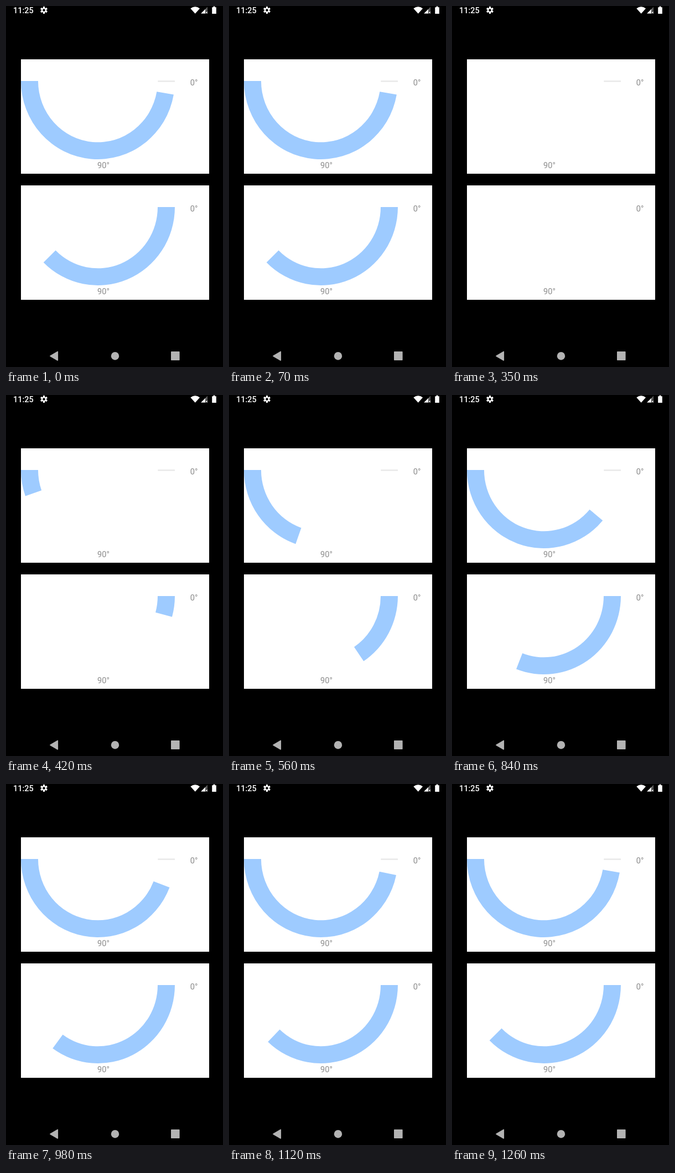
An HTML page for the animation above (2100 ms loop, 392 px wide and 650 px high).

```html
<!DOCTYPE html>
<html lang="en">
<head>
<meta charset="utf-8">
<title>Arc gauges</title>
<style>
  html, body { margin: 0; width: 100%; height: 100%; overflow: hidden; background: #000; }
  svg { display: block; width: 392px; height: 650px; }
  text { font-family: Roboto, sans-serif; }
  .label { font-size: 14.6px; fill: #8c8c8c; }
  .arc { fill: #9ecbff; }
</style>
</head>
<body>
<svg viewBox="0 0 392 650" xmlns="http://www.w3.org/2000/svg">
  <rect width="392" height="650" fill="#000"/>

  <g fill="#fff">
    <text x="13" y="13.2" font-size="14.5" font-weight="500">11:25</text>
    <g transform="translate(68.5 7.5)">
      <path id="gear" fill-rule="evenodd"/>
    </g>
    <path d="M333.3 4.4Q341.7 -1.8 350.1 4.4L341.7 13.8Z"/>
    <path d="M352.2 13.6L364 1.6V13.6Z" fill="#5c5c5c"/>
    <path d="M352.2 13.6L360 5.7V13.6Z"/>
    <rect x="360" y="9" width="5" height="5" fill="#000"/>
    <path d="M360.7 9.8L364 13.3M364 9.8L360.7 13.3" stroke="#fff" stroke-width="1.1"/>
    <path d="M372.2 2.2H374.4V0.8H377.6V2.2H379.8V14H372.2Z"/>
  </g>

  <g>
    <rect x="27" y="96" width="340" height="206" fill="#fff"/>
    <rect x="274.3" y="134.2" width="30.8" height="2.6" fill="#e9e9e9"/>
    <path class="arc" id="top"/>
    <text class="label" x="332.8" y="142.5">0°</text>
    <text class="label" x="165" y="292.2">90°</text>
  </g>

  <g transform="translate(0 227)">
    <rect x="27" y="96" width="340" height="206" fill="#fff"/>
    <path class="arc" id="bottom"/>
    <text class="label" x="332.8" y="142.5">0°</text>
    <text class="label" x="165" y="292.2">90°</text>
  </g>

  <g fill="#b3b3b3" stroke="#b3b3b3" stroke-linejoin="round">
    <path d="M80 630.2L93.3 622.4V638Z" stroke-width="1.6"/>
    <circle cx="197" cy="630.2" r="7.2" stroke="none"/>
    <rect x="298.8" y="622.9" width="14" height="14.4" stroke-width="1.6"/>
  </g>
</svg>
<script>
const LOOP = 2100, STEP = 70;
const START = 374, SPAN = 856, POWER = 2.2;
const CX = 166, CY = 135;
const OUTER = [139, 141], INNER = [108, 110.3];

const byId = id => document.getElementById(id);

function point([rx, ry], deg) {
  const a = deg * Math.PI / 180;
  return (CX + rx * Math.cos(a)).toFixed(2) + ' ' + (CY + ry * Math.sin(a)).toFixed(2);
}

// Ring segment from one angle to a larger one, clockwise from the right.
function ring(from, to) {
  if (to - from < 0.01) return '';
  return `M${point(OUTER, from)}A${OUTER} 0 0 1 ${point(OUTER, to)}` +
         `L${point(INNER, to)}A${INNER} 0 0 0 ${point(INNER, from)}Z`;
}

function gearPath() {
  let d = '';
  for (let i = 0; i < 6; i++) {
    [[-20, 4.6], [-14, 6.7], [14, 6.7], [20, 4.6]].forEach(([off, r]) => {
      const a = (i * 60 - 90 + off) * Math.PI / 180;
      d += (d ? 'L' : 'M') + (r * Math.cos(a)).toFixed(2) + ' ' + (r * Math.sin(a)).toFixed(2);
    });
  }
  return d + 'ZM-2.3 0A2.3 2.3 0 1 0 2.3 0A2.3 2.3 0 1 0 -2.3 0Z';
}

function progress(t) {
  if (t < 350) return 1;
  const u = Math.min(1, Math.max(0, (t - START) / SPAN));
  return 1 - Math.pow(1 - u, POWER);
}

const top_ = byId('top'), bottom = byId('bottom');
byId('gear').setAttribute('d', gearPath());

function draw(ms) {
  const t = Math.floor((ms % LOOP) / STEP) * STEP;
  const p = progress(t);
  top_.setAttribute('d', ring(180 - 170 * p, 180));
  bottom.setAttribute('d', ring(0, 135 * p));
}

let origin = null;
function tick(now) {
  if (origin === null) origin = now;
  draw(now - origin);
  requestAnimationFrame(tick);
}
draw(0);
requestAnimationFrame(tick);
</script>
</body>
</html>
```
